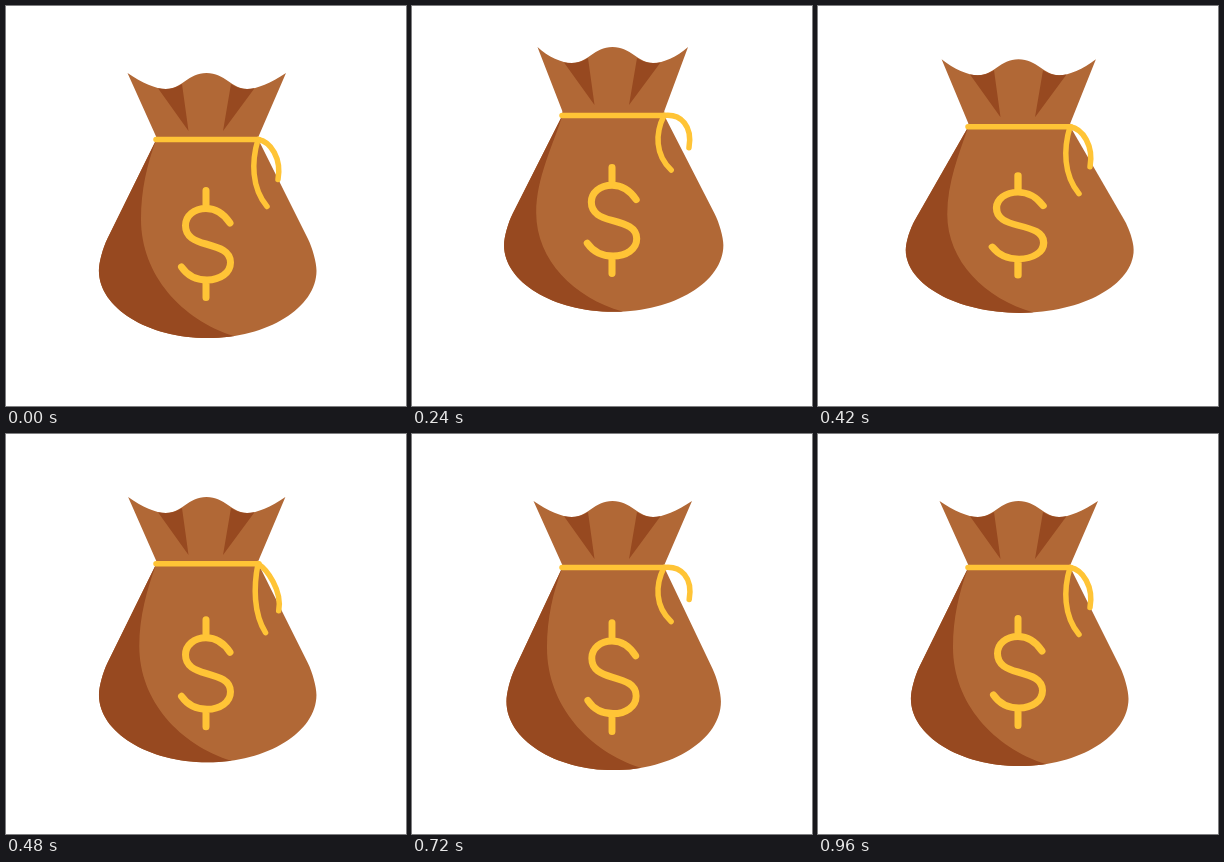
An HTML page that plays this animation: 400x400 px, repeating every 2.02 s.

```html
<!DOCTYPE html>
<html lang="en">
<head>
<meta charset="utf-8">
<title>Money bag</title>
<style>
  html, body { margin: 0; width: 100%; height: 100%; overflow: hidden; background: #fff; }
  svg { display: block; width: 100%; height: 100%; }
  .light { fill: #b16836; }
  .dark { fill: #974920; }
  .cord { fill: none; stroke: #ffc436; stroke-width: 5.5; stroke-linecap: round; stroke-linejoin: round; }
  #dollar { stroke-width: 7; }
</style>
</head>
<body>
<svg viewBox="0 0 400 400">
  <clipPath id="inside"><path id="bodyClip"/></clipPath>
  <path id="body" class="light"/>
  <path id="shade" class="dark" clip-path="url(#inside)"/>
  <g id="top">
    <path id="frill" class="light"/>
    <path class="dark" d="M152 82.3Q166 84.8 176 78L182.5 125Z"/>
    <path class="dark" d="M248.5 82.3Q235 84.8 225 78L217 125Z"/>
  </g>
  <path id="tie" class="cord"/>
  <path id="innerCord" class="cord"/>
  <path id="outerCord" class="cord"/>
  <path id="dollar" class="cord" d="M24 -21C18 -30 10 -35.5 0 -35.5C-12 -35.5 -20.5 -28 -20.5 -18.5
    C-20.5 -7 -11 -3 0 0C14 4 24.5 7 24.5 18.5C24.5 29 14 36 1 36C-10 36 -19 31 -24.5 23
    M0 -53.5V-36M0 36V53.5"/>
</svg>
<script>
const LOOP = 2020, STEP = 30, ACTIVE = 960;
const REST_HEIGHT = 198.5, REST_HALF = 108.8, CENTER = 201.7;
const NECK = { left: 150.3, right: 252.3, y: 133.5 };

const el = id => document.getElementById(id);
const draw = (id, d) => el(id).setAttribute("d", d);
const mix = (a, b, u) => a + (b - a) * u;

// Ease in and out between [time, value] points.
function follow(t, ...points) {
  const next = points.findIndex(([time]) => time > t);
  if (next < 0) return points.at(-1)[1];
  const [t0, a] = points[next - 1], [t1, b] = points[next];
  const u = (t - t0) / (t1 - t0);
  return mix(a, b, u * u * (3 - 2 * u));
}

// One side of the body; dir is -1 for left and 1 for right.
function bodySide(dir, half, neck, wide, base) {
  const edge = CENTER + dir * half;
  const start = dir < 0 ? NECK.left : NECK.right;
  const hip = [mix(edge, start, 0.15), mix(neck, wide, 0.755)];
  const cornerY = neck + (hip[1] - neck) / 0.85;
  return [
    [start, neck],
    hip,
    [mix(hip[0], edge, 0.55), mix(hip[1], cornerY, 0.55)],
    [edge, mix(wide, cornerY, 0.55)],
    [edge, wide],
    [edge, mix(wide, base, 0.55)],
    [mix(CENTER, edge, 0.55), base],
    [CENTER, base]
  ];
}

function bodyPath(half, neck, wide, base) {
  const left = bodySide(-1, half, neck, wide, base);
  const right = bodySide(1, half, neck, wide, base).reverse();
  return `M${left[0]}L${left[1]}C${left.slice(2).join(" ")}
    ${right.slice(1, 7).join(" ")}L${right[7]}Z`;
}

function render(t) {
  const lift = follow(t, [0, 0], [163, 24], [313, 24], [536, 0]);
  const height = follow(t, [0, REST_HEIGHT], [120, 208], [375, 182.4], [600, 218.5], [780, 197], [960, REST_HEIGHT]);
  const signDrop = follow(t, [0, 104.5], [120, 113], [375, 95.3], [600, 127], [780, 103.5], [960, 104.5]);
  const sway = follow(t, [0, 0], [345, -10], [480, 7], [720, -8], [960, 0]);

  const stretch = height / REST_HEIGHT - 1;
  const half = REST_HALF * (1 + stretch) ** -0.72;
  const neck = NECK.y - lift, wide = neck + 0.661 * height, base = neck + height;

  const body = bodyPath(half, neck, wide, base);
  draw("body", body);
  draw("bodyClip", body);

  const shadeX = 135 - 0.45 * lift;
  const shadeY = 213 - 0.25 * lift + 25 * stretch;
  const endX = 228 - 0.7 * lift + 60 * stretch;
  const endY = base - 0.0028 * (endX - CENTER) ** 2;
  draw("shade", `M${NECK.left} ${neck}
    C141 ${mix(neck, shadeY, 0.31)} ${shadeX} ${mix(neck, shadeY, 0.64)} ${shadeX} ${shadeY}
    C${shadeX} ${mix(shadeY, endY, 0.48)} ${mix(shadeX, endX, 0.44)} ${mix(shadeY, endY, 0.86)} ${endX} ${endY}
    V400H0V${neck}Z`);

  const inset = 0.165 * lift;
  el("top").setAttribute("transform", `translate(0 ${-1.08 * lift})`);
  draw("frill", `M${121.5 + inset} 67C136 77 150 83 160 83C176 83 182 67 200.5 67
    C219 67 226 83 241 83C251 83 265 77 ${280 - inset} 67L${NECK.right} 131V135H${NECK.left}V131Z`);

  draw("tie", `M150 ${neck}H253`);

  const bulge = 245.4 + 0.3 * sway;
  const innerLength = 67 + 0.9 * sway - 0.09 * sway ** 2;
  draw("innerCord", `M252 ${neck}C${bulge} ${neck + 0.33 * innerLength}
    ${bulge} ${neck + 0.72 * innerLength} ${261 - 0.03 * sway ** 2} ${neck + innerLength}`);

  const outerX = 272 - 0.25 * sway + 0.05 * sway ** 2;
  draw("outerCord", `M252 ${neck}C${264.7 - 0.55 * sway} ${neck + 2 + 0.5 * sway}
    ${outerX + 3.8} ${neck + 19 + 1.1 * sway} ${outerX} ${neck + 40 + sway}`);

  const signHeight = 1 + 0.83 * stretch - 4 * stretch ** 2;
  el("dollar").setAttribute("transform",
    `translate(200 ${neck + signDrop}) scale(${half / REST_HALF} ${signHeight})`);
}

const start = performance.now();
function tick() {
  const t = (performance.now() - start) % LOOP;
  render(Math.min(Math.floor(t / STEP) * STEP, ACTIVE));
  requestAnimationFrame(tick);
}
tick();
</script>
</body>
</html>
```
